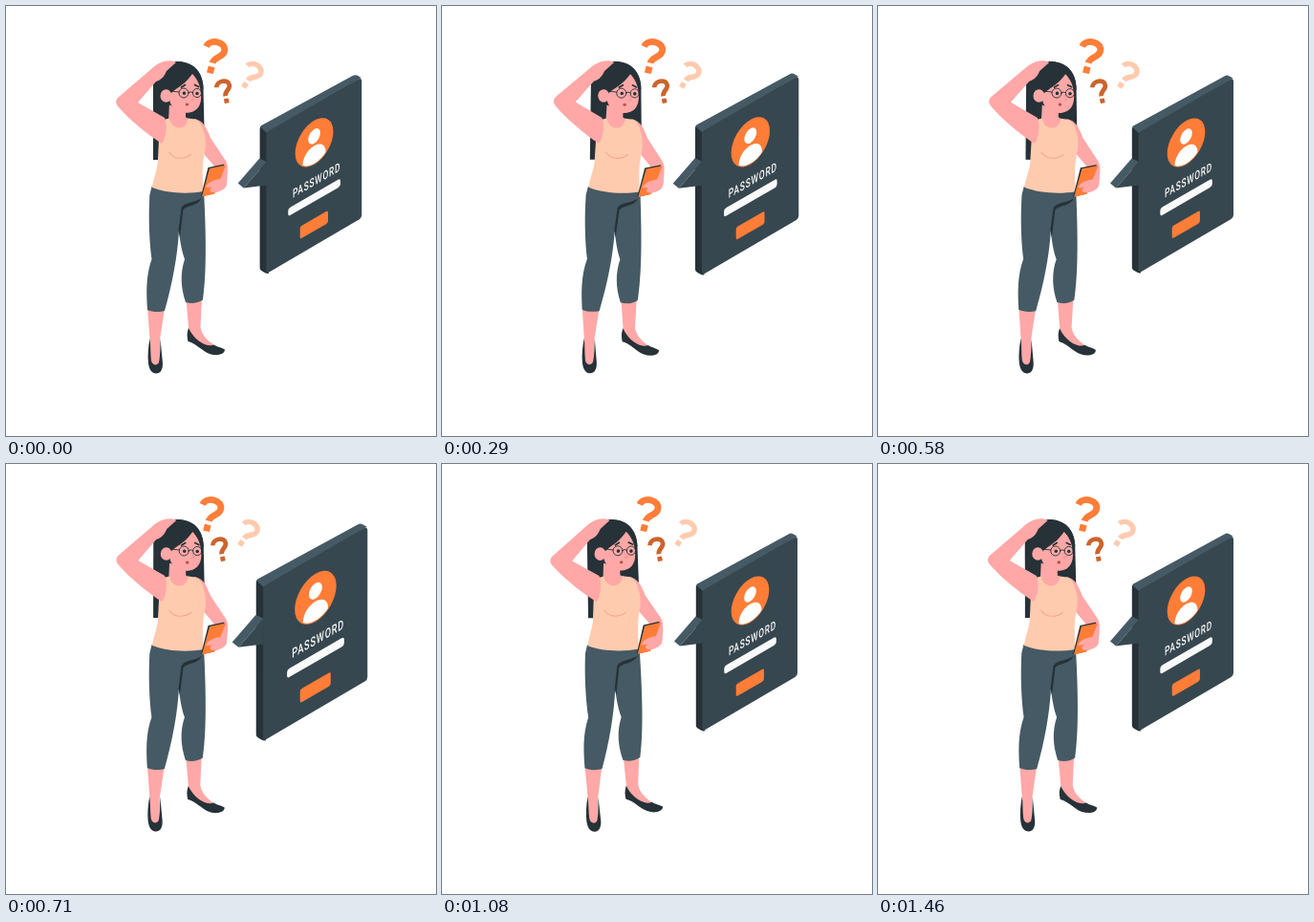
These frames come from a looping animation (450x450 px, 1500 ms). An HTML page:

```html
<!DOCTYPE html>
<html lang="en">
<head>
<meta charset="utf-8">
<title>Forgotten password</title>
<style>
  html, body { margin: 0; width: 100%; height: 100%; overflow: hidden; background: #fff; }
  svg { display: block; width: 100vw; height: 100vh; }
  .skin { fill: #ffa8a7; }
  .dark { fill: #263238; }
  .cloth { fill: #455a64; }
  .peach { fill: #ffcbaf; }
  .orange { fill: #ff7d37; }
  .line { fill: none; stroke: #263238; stroke-linecap: round; }
  text { font: 500 12.6px Roboto, sans-serif; fill: #fafafa; letter-spacing: 1.1px; }
</style>
</head>
<body>
<svg viewBox="0 0 450 450">
  <defs>
    <g id="ask">
      <path d="M-11 -8.2C-9 -18 9 -18 8.6 -7.5C8.3 -1 -.5 0 -.5 7" fill="none" stroke="currentColor" stroke-width="6.8"/>
      <rect x="-4" y="11" width="7" height="7" rx=".6" fill="currentColor"/>
    </g>
  </defs>

  <g id="person">
    <!-- hair behind the body -->
    <path class="dark" d="M154 161V82C155 66 168 57.500 181 58C198 59 206 71 206.500 86L207.500 128L162 161Z"/>

    <!-- legs and shoes -->
    <path class="skin" d="M148 315L166 316L161 350L161 372C160 378 153 378 151 372L150.500 348Z"/>
    <path class="dark" d="M150.500 348C149 356 148 366 149 374C150 381 153 385 158 384.500C163 384 164.500 378 163.800 372L161.500 348C161.300 357 161.500 367 160 373C158 377 153 376 152 371C151 363 151.500 355 150.500 348Z"/>
    <path class="skin" d="M188.500 307L205 305L203.500 336C205 345 211 350 218 355L212 360L192 347Z"/>
    <path class="dark" d="M191 337C189 342 189.500 347 190.500 351C199 353 205 361 213 364C220 366.500 229 365 229 359.500C225 357 221 357 217.500 354.500C212 357.500 198 352 191 337Z"/>

    <!-- trousers -->
    <path class="cloth" d="M152.500 189L150.300 198C149 222 150 247 152.500 265C146 283 147 302 148 318C153 320.500 161 320.500 166 319C174 291 179.500 262 181 235C182 246 184 257 187 265C182 280 183 295 188 310C194 312 201 311 206 307.500C210 280 209.500 240 207 193Z"/>
    <path class="dark" d="M205 201C198 206 187 205 183.500 211L180.500 235L182 242L185.500 213C190 208 200 210 205 201Z"/>

    <!-- neck, far arm -->
    <path class="skin" d="M171 101L170 122L181 131L191 126L191.500 118L188 116.500V107Z"/>
    <path class="skin" d="M197 118C207 120 210 128 214 138L230 162C233 167 232 175 231 185C230 192 222 196 214 195L209 188L219 169L204 151Z"/>

    <!-- top -->
    <path class="peach" d="M165 119L171 117.500C172 124 177 128 182 127.500C187 127 190 123 190.500 117.500L198 118.500C202 120 206 125 206.500 131C210 139 209 150 207 158C205 170 206 181 206.500 194C190 197 168 196 153 190C154 180 159 171 159 160L160 140Z"/>
    <path d="M170.500 153C176 161 187 161 194 155" fill="none" stroke="#efab91" stroke-width="1.100"/>

    <!-- head -->
    <path class="dark" d="M160 100C158 72 165 59 181 58.500C198 59 206 71 206.500 86L202 106L175 105Z"/>
    <path class="skin" d="M171 96C172 87 184 87 195 71C200 76 203.500 83 204 92C205 103 201 110 192 111.500C183 113 173 109 171 98Z"/>
    <ellipse class="skin" cx="167.500" cy="94" rx="6" ry="6.800"/>
    <path class="line" d="M183.500 85L187.500 82.500M197.500 82.500L201.500 84.500" stroke-width="1.700"/>
    <g class="line" stroke-width=".9">
      <circle cx="186" cy="91" r="5"/>
      <circle cx="200" cy="91" r="4.600"/>
      <path d="M191 90.500Q193 89 195.400 90.500M181 90L172 89"/>
    </g>
    <circle class="dark" cx="186.500" cy="91.300" r="1.800"/>
    <circle class="dark" cx="200" cy="91.500" r="1.800"/>
    <path d="M194.500 93L196.500 98L193.500 98.500" fill="none" stroke="#f28b8b" stroke-width=".8"/>
    <ellipse cx="189.500" cy="103" rx="1.800" ry="1.600" fill="#b0564f"/>

    <!-- raised arm -->
    <path class="skin" d="M178 59C171 55 160 58 152 66L117 96C114.500 99 114.500 102 117 105C130 120 149 135 163 144C168 138 169 124 166 117L138 101L157 79C163 77 166 73 168 68Z"/>

    <!-- phone and hand -->
    <path class="dark" d="M211.500 169L228.500 165.500L217 196.500L204 199.500Z"/>
    <path class="orange" d="M213 170L230 166.500L218.500 196.500L205 199.500Z"/>
    <path class="skin" d="M231 177L224 181C217 182 211 185 209 189.500C211 190.500 214 189 216 189.500C212 191 213 195 217 195C225 194 231 191 231 186Z"/>
  </g>

  <g id="marks">
    <use href="#ask" color="#ff7d37" transform="translate(218.300 53) rotate(14)"/>
    <use href="#ask" color="#ffcbaf" transform="translate(256.700 73) rotate(32) scale(.82)"/>
    <use href="#ask" color="#cc642c" transform="translate(229 89.300) rotate(-12) scale(.7)"/>
  </g>

  <g id="panel">
    <path class="dark" d="M265.800 128.500Q265.800 126.500 268 125L275 132V279.500Q272 279.500 270 278L267.500 276.500Q265.800 275.500 265.800 273.500Z"/>
    <path class="cloth" d="M266.300 127Q266.800 126 268 125L362.500 73.500Q365 72 367 73L371.500 75.500L274 134Z"/>
    <path class="cloth" d="M243 185.500L265.500 159.500L273 163L249 190.400Z"/>
    <path fill="#37474f" d="M249 190.400L273 163V187.500Z"/>
    <path fill="#37474f" d="M272.500 135.500Q272.500 132.500 275 131L368.500 77Q372 75 372 79V218.500Q372 221.500 369.500 223L276 277.800Q272.500 279.800 272.500 276.300Z"/>

    <g transform="matrix(.866 -.5 0 1 322.500 143)">
      <circle class="orange" r="22.900"/>
      <circle cy="-6.500" r="7.300" fill="#fff"/>
      <path fill="#fff" d="M-13.800 17C-13.800 -1 13.800 -1 13.800 17C7 23.500 -7 23.500 -13.800 17Z"/>
    </g>
    <text transform="matrix(.665 -.384 0 1 300 200.800)">PASSWORD</text>
    <rect width="54.500" height="8.300" rx="2.500" fill="#fafafa" transform="matrix(1 -.577 0 1 295.300 211.800)"/>
    <rect class="orange" width="29.200" height="13" rx="2" transform="matrix(1 -.577 0 1 307.700 230.600)"/>
  </g>
</svg>

<script>
const LOOP = 1500;
const part = id => document.getElementById(id);
const person = part('person'), marks = part('marks'), panel = part('panel');

// Cubic Bézier easing, solved by bisection
const bezier = (x1, y1, x2, y2) => x => {
  const at = (a, b, s) => 3 * a * s * (1 - s) ** 2 + 3 * b * s * s * (1 - s) + s ** 3;
  let lo = 0, hi = 1;
  for (let i = 0; i < 24; i++) {
    const mid = (lo + hi) / 2;
    if (at(x1, x2, mid) < x) lo = mid; else hi = mid;
  }
  return at(y1, y2, lo);
};
const linear = x => x;
const ease = bezier(.25, .1, .25, 1);
const overshoot = bezier(.36, -.01, .5, 1.38);

// keys: [progress, value] pairs, eased between neighbours
const track = (keys, easing) => p => {
  const i = Math.max(1, keys.findIndex(k => k[0] >= p));
  const [p0, v0] = keys[i - 1], [p1, v1] = keys[i];
  return v0 + (v1 - v0) * easing((p - p0) / (p1 - p0));
};

const sway = track([[0, 0], [.25, 1], [.75, -1], [1, 0]], linear);
const beat = track([[0, 1], [.1, 1.1], [.3, 1], [.4, 1], [.5, 1.1], [.6, 1], [1, 1]], ease);
const shake = track([0, -1, 2, -4, 4, -4, 4, -4, 2, -1, 0].map((v, i) => [i / 10, v * .9]), overshoot);

function draw(time) {
  const p = time % LOOP / LOOP;
  const scale = beat((p + 8 / LOOP) % 1);
  person.setAttribute('transform', `rotate(${sway(p)} 173 221)`);
  marks.setAttribute('transform', `translate(${shake(p)})`);
  panel.setAttribute('transform', `translate(307.5 176) scale(${scale}) translate(-307.5 -176)`);
}

function tick(now) {
  draw(now);
  requestAnimationFrame(tick);
}
draw(0);
requestAnimationFrame(tick);
</script>
</body>
</html>
```
